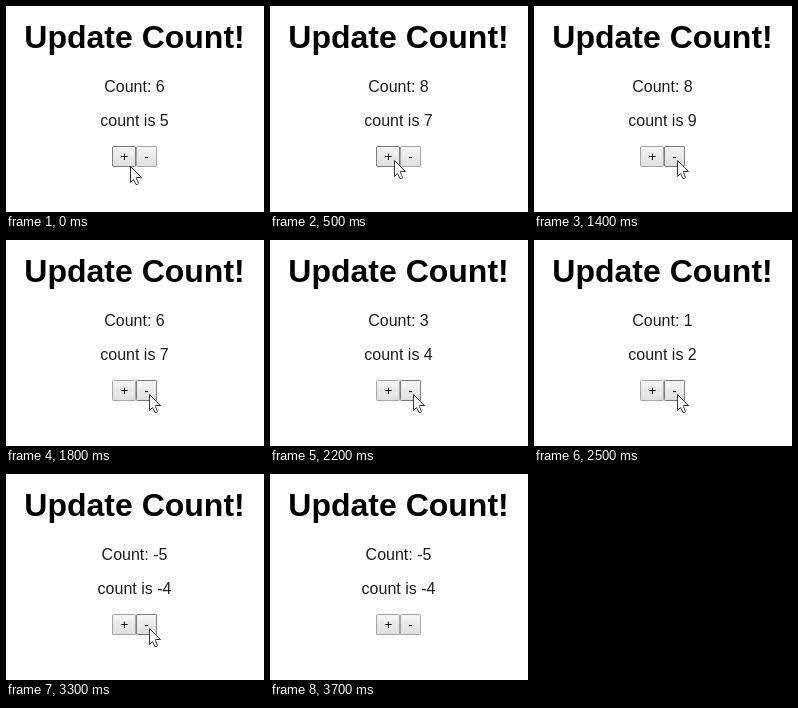
Recreate the animation shown at these times as an HTML page. Size 258 by 206 pixels, loop 4.1 s.

```html
<!DOCTYPE html>
<html lang="en">
<head>
<meta charset="utf-8">
<title>Update Count!</title>
<style>
  html, body { margin: 0; width: 100%; height: 100%; overflow: hidden; background: #fff; }
  svg { display: block; width: 258px; height: 206px; }
  text { font: 16px "Liberation Sans", Arial, sans-serif; text-anchor: middle; fill: #1c1c1c; }
  .title { font-size: 32px; font-weight: bold; fill: #000; }
  .button text { font-size: 13.333px; fill: #000; }
  .button rect { fill: url(#face); stroke: #a6a6a6; }
  .button.hover rect { stroke: #7b7b7b; }
  .button.pressed rect { fill: url(#down); }
</style>
</head>
<body>
<svg viewBox="0 0 258 206">
  <defs>
    <linearGradient id="face" x2="0" y2="1">
      <stop stop-color="#f6f6f6"/><stop offset="1" stop-color="#dedede"/>
    </linearGradient>
    <linearGradient id="down" x2="0" y2="1">
      <stop stop-color="#dadada"/><stop offset="1" stop-color="#eaeaea"/>
    </linearGradient>
  </defs>
  <text class="title" x="128.5" y="42">Update Count!</text>
  <text id="count" x="128.5" y="86"></text>
  <text id="last" x="128.5" y="120"></text>
  <g class="button" id="plus">
    <rect x="106.5" y="140.5" width="23" height="20" rx=".7"/>
    <text x="118.4" y="155">+</text>
  </g>
  <g class="button" id="minus">
    <rect x="130.5" y="140.5" width="20" height="20" rx=".7"/>
    <text x="140.5" y="155">-</text>
  </g>
  <path id="cursor" d="M.5 .5V16.5L3.5 13.5L6 18.5H7.5L8.5 17.5L6.5 12.5V11.5H11.5Z"
    fill="#fff" stroke="#222" stroke-width=".9"/>
</svg>
<script>
// Times below are in steps of 100 ms.
const LOOP = 4100, STEP = 100;
const [count, last, plus, minus, cursor] =
  ["count", "last", "plus", "minus", "cursor"].map(id => document.getElementById(id));

const clamp = (v, lo, hi) => Math.min(hi, Math.max(lo, v));
const progress = (t, from, to) => clamp((t - from) / (to - from), 0, 1);
const easeIn = u => u * u;
const easeOut = u => 1 - easeIn(1 - u);

// Clicks made by time t at a steady rate, up to a limit.
const clicks = (t, start, rate, limit) => clamp(Math.floor((t - start) * rate), 0, limit);
const ups = t => clicks(t, 0, 0.45, 4);
const downs = t => clicks(t, 10, 0.5, 4) + clicks(t, 18, 0.75, 11);

function pointer(t) {
  const rise = easeOut(progress(t, 0, 3));
  const across = easeOut(progress(t, 8, 11));
  const leave = easeIn(progress(t, 33, 37));
  return {
    x: Math.round(124 + 19 * across - 112 * leave),
    y: Math.round(160 - 6 * rise + 64 * leave)
  };
}

function draw(t) {
  const down = downs(t), value = 6 + ups(t) - down;
  count.textContent = `Count: ${value}`;
  last.textContent = `count is ${value + (down ? 1 : -1)}`;

  const { x, y } = pointer(t);
  cursor.setAttribute("transform", `translate(${x} ${y})`);
  const inside = y <= 161, onMinus = inside && x >= 130;
  plus.classList.toggle("hover", inside && x < 130);
  minus.classList.toggle("hover", onMinus);
  // The button is held down between two clicks.
  minus.classList.toggle("pressed", onMinus && t > 10 && t < 33 && down === downs(t - 1));
}

let shown = -1;
function tick() {
  const t = Math.floor(performance.now() % LOOP / STEP);
  if (t !== shown) draw(shown = t);
  requestAnimationFrame(tick);
}
tick();
</script>
</body>
</html>
```
